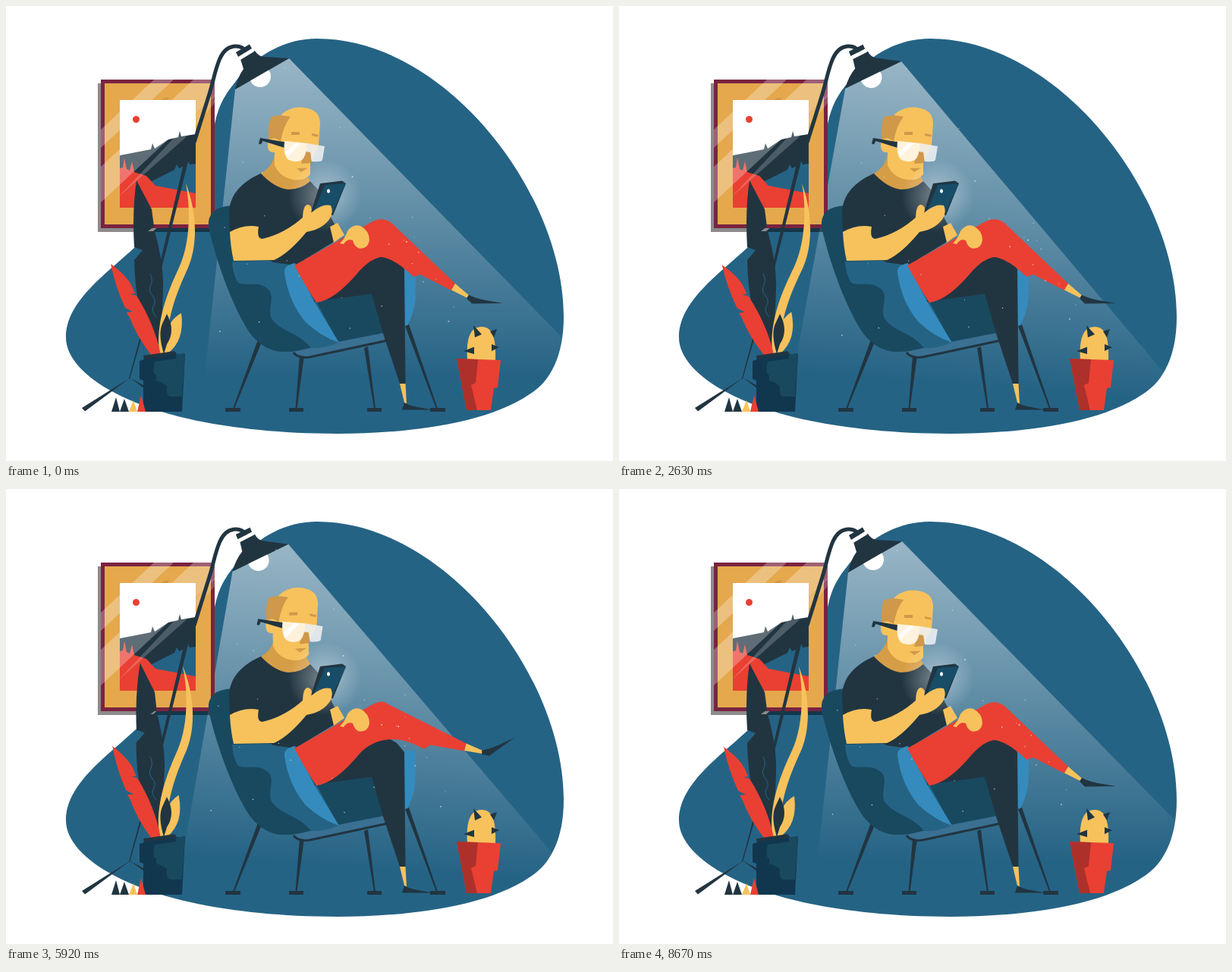
Write an HTML page that moves like this. It is 800 by 600 pixels and loops after 8710 ms.

```html
<!DOCTYPE html>
<html lang="en">
<head>
<meta charset="utf-8">
<title>Reading by lamplight</title>
<style>
html, body { margin: 0; width: 100%; height: 100%; overflow: hidden; background: #fff; }
svg { display: block; width: 800px; height: 600px; }
.ink { fill: #213541; }
.skin { fill: #f7c25c; }
.tan { fill: #cf984a; }
.red { fill: #e94033; }
.teal { fill: #19495f; }
.blue { fill: #256385; }
.sky { fill: #358bbd; }
.line { fill: none; stroke: #213541; }
</style>
</head>
<body>
<svg viewBox="0 0 800 600">
  <defs>
    <path id="blob" d="M410 43C578 43 735 245 735 410C735 465 715 497 690 512C630 553 520 564 437 564C330 564 250 549 205 535C130 512 79 475 79 437C79 390 130 355 170 318C225 270 262 240 270 190C275 150 278 130 300 103C330 62 370 43 410 43Z"/>
    <clipPath id="inBlob"><use href="#blob"/></clipPath>
    <clipPath id="inFrame"><path d="M125 97H275V293H125Z"/></clipPath>
    <linearGradient id="beam" gradientUnits="userSpaceOnUse" x1="0" y1="70" x2="0" y2="488">
      <stop offset="0" stop-color="#fff" stop-opacity=".53"/>
      <stop offset="1" stop-color="#fff" stop-opacity="0"/>
    </linearGradient>
    <radialGradient id="shine">
      <stop offset="0" stop-color="#fff" stop-opacity=".42"/>
      <stop offset="1" stop-color="#fff" stop-opacity="0"/>
    </radialGradient>
  </defs>

  <use href="#blob" class="blue"/>
  <g clip-path="url(#inBlob)">
    <path id="cone" fill="url(#beam)" d="M302 110L373 69L852 559L249 610Z"/>
  </g>

  <!-- picture -->
  <path d="M121 102H125V293H271V298H121Z" opacity=".45"/>
  <path fill="#7a2340" d="M125 97H275V293H125Z"/>
  <path fill="#e5a84c" d="M130 102H270V288H130Z"/>
  <path fill="#fff" d="M150 124H250V266H150Z"/>
  <path class="tan" d="M205 124Q208 120 215 121L213 124Z"/>
  <circle class="red" cx="171.500" cy="149.500" r="4.500"/>
  <path class="ink" d="M150 197L191 189L193 181L196 188L214 176L227 173L229 165L231 172L250 169V266H150Z"/>
  <path class="blue" d="M186 234L222 216L225 209L228 214L237 210L239 202L242 209L250 208V266H186Z"/>
  <path class="red" d="M150 214L154 213L156 200L159 215L163 217L166 205L169 219L185 224L197 237L250 247V266H150Z"/>
  <g fill="#fff" clip-path="url(#inFrame)">
    <path opacity=".28" d="M195 97H221L125 187V163ZM247 97H275V119L125 259V212Z"/>
    <path opacity=".2" d="M148 252L275 117V128L236 174Z"/>
  </g>

  <!-- floor lamp -->
  <path class="line" stroke-width="5" d="M317 60C309 50 291 49 282 69C275 85 274 97 268 116L248 180"/>
  <path class="ink" d="M250.500 172L241 201L207 338L163 492L162 491L203.500 337L236 200L245 172Z"/>
  <path class="ink" d="M164 490L104 534.500L100 530ZM163 490L188 504L186 507Z"/>
  <g id="lamp">
    <circle cx="335" cy="93" r="14" fill="#fff"/>
    <path class="ink" d="M303 61L321 50.500L324 56L306 67ZM309 70L328 59Q332 66 340 67L373 69L302 110Q305 94 313 83Z"/>
    <path d="M307 68L325 57.500L327 60L309 71Z" fill="#fff"/>
  </g>

  <!-- chair -->
  <path class="ink" d="M332 440L337 443L301 531H299ZM387 461H393L383.500 531H381.500ZM472 451L477 449L487 531H485ZM526 422L531 420L569 531H567Z"/>
  <path class="line" stroke-width="5" d="M289 532.500h20m64 0h19m84 0h19m64 0h20"/>
  <path class="sky" d="M515 345H540L539.500 388Q536 410 529 421L515 425Z"/>
  <path class="teal" d="M300 263Q264 264 267 292C278 340 300 400 322 432Q340 455 365 456L400 455L503 432L500 370L380 330Z"/>
  <path d="M378 456L437 443L503 430V440L400 462Q384 463 378 456Z" fill="#3a7092"/>
  <path class="line" stroke-width="3" d="M379 457Q385 465 400 463L503 441"/>
  <path class="blue" d="M298 337L380 335L438 444Q420 452 402 451C386 430 362 430 350 412C344 400 356 382 345 373C332 362 318 370 306 365Q299 355 298 337Z"/>

  <!-- reader -->
  <path class="ink" d="M405 390L482 379.500L497 432L519 498H526.500L525 347L515 335Q500 325 490 328L440 350Z"/>
  <path class="skin" d="M519 498H526.500L528 525L525 523Z"/>
  <path id="tapShoe" class="ink" d="M525 523Q532 527 538 528L562 532.500H522Z"/>
  <path class="ink" d="M338 220C318 228 296 244 294 270L295 300L352 338L381 342L442 305L430 282L411 242L399 229Q370 255 338 220Z"/>
  <path fill="#d69d47" d="M336 221Q352 211 354 195L396 222L401 231Q389 242 372 242Q354 240 336 221Z"/>

  <g id="head">
    <path class="skin" d="M363 143Q374 133 389 133.500Q414 135 414 155L412 184L401 207V222Q394 231 379 229Q361 226 354 210V193Q345 194 345 184Q344 175 353 174Z"/>
    <path class="tan" d="M349 147Q358 142 375 146Q366 157 362 178L356 175Q349 172 346.500 180Q344 160 349 147Z"/>
    <path class="skin" d="M357 177Q346 171 345 183Q346 194 356 192Z"/>
    <path id="browL" class="tan" d="M376 166H387V170H376Z"/>
    <path id="browR" class="tan" d="M403 168L412 170L411 172.500L403 171Z"/>
    <path class="tan" d="M393 191H403L402 207L389 208ZM383 214L398 213.500L389 219Z"/>
    <path class="ink" d="M335 174L368 179.500L367 187L338.500 178L336 182.500L333 181.500Z"/>
    <path d="M367 178L397 181Q396 198 390 203Q380 208 371 202Q365 195 367 178Z" fill="#fff7e8" opacity=".92"/>
    <path d="M397 181L420 185L417 203Q416 206 403 205L401 193L395 192Z" fill="#eef0f2" opacity=".88"/>
    <path d="M368 193L383 180L389 181L371 199Z" fill="#fff" opacity=".9"/>
  </g>

  <circle cx="420" cy="250" r="48" fill="url(#shine)"/>
  <path class="skin" d="M427 291L437 286L446 302L432 312Z"/>
  <path class="sky" d="M381 339Q366 342 367 351Q372 390 395 417Q414 435 439 444L405 388Z"/>
  <path id="thigh" class="red"/>
  <g id="shin">
    <path class="skin" d="M592 366L587 374.500L608 385L610 381.500Z"/>
    <path id="shoe" class="ink" d="M610 381Q620 386 632 388L655 392L614 392.500L607 385.500Z"/>
  </g>
  <path class="skin" d="M440 313Q447 306 450 297Q457 287 467 290Q479 296 479 309Q477 321 465 319.500Q459 317 457 309Q450 306 445 314Z"/>
  <path class="ink" d="M414 234L443 230.500L448 234L431 276L402 272Z"/>
  <path d="M420 236L448 234L430 273L405 273Z" fill="#184d67"/>
  <ellipse cx="425" cy="244" rx="2" ry="2.700" fill="#fff"/>
  <path class="skin" d="M295 298Q314 287 333 291Q330 307 338 307Q368 300 392 278L403 272Q417 260 428 263Q432 271 427 280Q418 294 396 298Q372 327 353 335L300 336Q296 318 295 298Z"/>
  <path id="thumb" class="skin" d="M391 282Q391 262 398 262Q405 263 402 274L405 283Z"/>

  <!-- plant -->
  <path id="tall" class="ink" d="M172 230L192 268L195 291L187 297L196 297Q208 340 207 372Q206 420 201 458H194Q170 400 169 335L180 322L169 318Q166 270 172 230Z"/>
  <path fill="none" stroke="#256385" d="M190 353Q194 361 191 368Q187 375 193 382Q199 389 194 396Q191 402 198 410"/>
  <path id="long" class="skin" d="M237 234C254 278 251 320 240 345C224 380 212 410 211 458H202C197 415 214 375 228 345C242 315 244 270 237 234Z"/>
  <path id="scarlet" class="red" d="M138 340Q162 358 167 372L170 379L164 380L172 382Q196 420 204 460H191Q172 435 163 411L159 404L167 403L157 398Q144 370 138 340Z"/>
  <path id="small" class="skin" d="M231 405Q236 442 212 459H206Q209 416 231 405Z"/>
  <path class="ink" d="M212 406Q224 428 212 446L208 459Q200 432 206 419Z"/>
  <path class="ink" d="M181 461L222 455L226 460L182 468Z"/>
  <path d="M176 468L185 465L236 458L232 535H181V494L176 492Z" fill="#11374f"/>
  <path class="teal" d="M224 460L236 458L232 515H216Q211 514 212 501Q206 496 198 494V487Q192 486 196 469L224 465Z"/>
  <path class="ink" d="M139 535L145 516L150 535L156 518L162 535Z"/>
  <path class="skin" d="M162 535L168 520L173 535Z"/>
  <path class="red" d="M173 535L178 513L184 535Z"/>

  <!-- cactus -->
  <path class="skin" d="M608 467C606 438 612 423 627 423C641 423 646 437 645 467Z"/>
  <path class="ink" d="M616 421L627 433L618 437ZM638 429L647 426L643 437ZM603 455L617 449.500V459ZM640 446L650 450L640 455Z"/>
  <path class="red" d="M594 465L652 467L648 503L643 504L639 533H607Z"/>
  <path d="M594 465L622 466L619 497L613 500L621 533H607Z" fill="#ae302a"/>

  <g id="dust" fill="#fff"></g>
</svg>
<script>
const LOOP = 8710;
const TAU = Math.PI * 2;
const $ = id => document.getElementById(id);
const set = (id, name, value) => $(id).setAttribute(name, value);
const turn = (id, angle, x, y) => set(id, "transform", `rotate(${angle} ${x} ${y})`);

// Eased step from 0 to 1, and a pulse that rises and falls inside [from, to].
const ease = u => (1 - Math.cos(Math.PI * Math.min(1, Math.max(0, u)))) / 2;
const pulse = (t, from, to, ramp = (to - from) / 2) =>
  ease((t - from) / ramp) * ease((to - t) / ramp);

// Dust lies between the two edges of the light and drifts to and fro.
const rand = n => { const v = Math.sin(n * 12.9898) * 43758.5453; return v - Math.floor(v); };
const dots = Array.from({ length: 27 }, (_, i) => {
  const r = k => rand(i + 1 + 40 * k);
  const y = 75 + 355 * Math.sqrt(r(0));
  const left = 306 - .1 * (y - 110), right = 360 + .92 * (y - 69);
  const dot = document.createElementNS("http://www.w3.org/2000/svg", "circle");
  dot.setAttribute("r", .6 + .4 * r(1));
  dot.setAttribute("opacity", .4 + .4 * r(2));
  $("dust").append(dot);
  return { dot, y, x: left + (right - left) * r(3), dx: 8 + 6 * r(4), dy: 14 * (r(5) - .4) };
});

// Moves a point with the lower leg, hinged at the knee.
function hinge(x, y, angle) {
  const a = angle * Math.PI / 180, c = Math.cos(a), s = Math.sin(a);
  x -= 497; y -= 302;
  return `${497 + x * c - y * s} ${302 + x * s + y * c} `;
}

function drawLeg(t) {
  const kick = pulse(t, 2900, 6750, 800);
  const bob = pulse(t, 0, 2000);
  const leg = -17 * kick - 3 * bob + 1.4 * pulse(t, 6000, 8200);
  const p = (x, y) => hinge(x, y, leg);
  set("thigh", "d", "M380 342L478 287Q495 276 " + p(508, 286) + "L" + p(592, 366) + "L" + p(587, 375) +
    "L" + p(546, 354) + "L" + p(537, 357) + "Q" + p(513, 333) + p(494, 331) +
    "Q481 333 466 349Q434 388 409 391Q395 370 380 342Z");
  turn("shin", leg, 497, 302);
  turn("shoe", -18 * kick - 5 * bob, 609, 384);
}

function draw(now) {
  const t = now % LOOP;
  const wave = Math.sin(TAU * t / LOOP);
  const swing = (1 - Math.cos(2 * TAU * t / LOOP)) / 2;

  turn("lamp", 4.7 * swing, 318, 58);
  turn("cone", 4.7 * swing, 318, 58);

  const nod = pulse(t, 2700, 5300, 800) - .45 * pulse(t, 4500, 8500, 1000);
  const brow = 18 * pulse(t, 2900, 5000) - 10 * pulse(t, 300, 1900);
  set("head", "transform", `translate(${5.5 * nod} ${7.8 * nod}) rotate(${2 * nod} 389 185)`);
  turn("browL", brow, 381, 168);
  turn("browR", -brow, 408, 170);
  turn("thumb", -4 * pulse(t, 0, 1900) - 6 * pulse(t, 2900, 4700), 397, 282);

  drawLeg(t);
  const tap = [60, 1850, 4580, 6700].reduce((sum, at) => sum + pulse(t, at, at + 770), 0);
  turn("tapShoe", -20 * tap, 524, 532);

  turn("tall", 1.2 * pulse(t, 3800, LOOP, 2000), 200, 458);
  turn("long", 1.15 * wave, 208, 458);
  turn("scarlet", -1.2 * wave, 198, 458);
  turn("small", -4.4 * swing, 209, 458);

  for (const { dot, x, y, dx, dy } of dots) {
    dot.setAttribute("cx", x + dx * wave);
    dot.setAttribute("cy", y + dy * wave);
  }
}

function loop() {
  draw(performance.now());
  requestAnimationFrame(loop);
}
loop();
</script>
</body>
</html>
```
